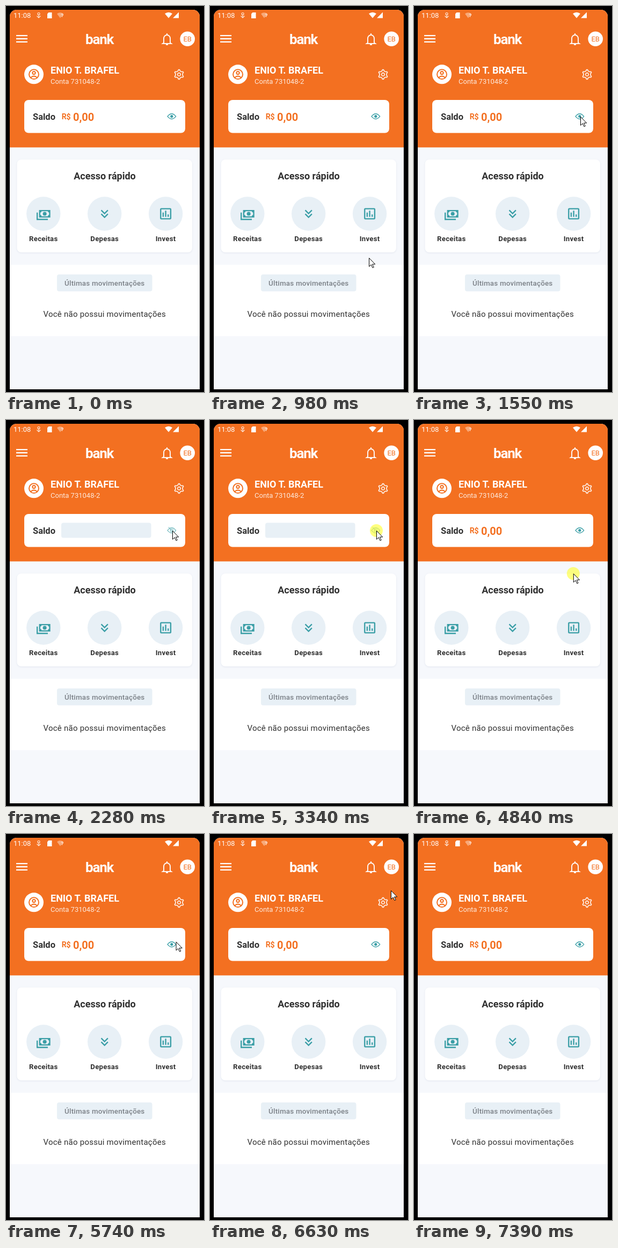
An HTML page that plays this animation: 369 by 719 pixels, repeating every 8000 ms.

```html
<!DOCTYPE html>
<html lang="pt">
<head>
<meta charset="utf-8">
<title>Saldo</title>
<style>
  html, body { margin: 0; width: 100%; height: 100%; overflow: hidden; background: #000; }
  svg { display: block; width: 369px; height: 719px; }
  text { font-family: Roboto, "Noto Sans", sans-serif; fill: #303030; }
  .bold { font-weight: 700; }
  .mid { text-anchor: middle; }
  .white { fill: #fff; }
  .orange { fill: #f37021; }
  .teal { fill: #3a9ea6; }
  .pale { fill: #e8f0f6; }
  .line { fill: none; stroke-width: 2; }
  .line.white { stroke: #fff; }
  .line.orange { stroke: #f37021; }
  .line.teal { stroke: #3a9ea6; }
  .card { fill: #fff; filter: drop-shadow(0 1px 1.5px rgba(90, 110, 150, .13)); }
</style>
</head>
<body>
<svg viewBox="0 0 369 719">
  <defs>
    <clipPath id="screen"><rect x="7" y="7" width="354" height="720" rx="12.500"/></clipPath>
  </defs>
  <rect width="369" height="719"/>
  <g clip-path="url(#screen)">
    <rect width="369" height="714" fill="#f6f8fc"/>
    <rect class="orange" width="369" height="263.400"/>
    <rect class="white" y="482" width="369" height="133"/>
  </g>

  <!-- status bar -->
  <text class="white" x="14" y="22.400" font-size="13">11:08</text>
  <g class="white">
    <path d="M79.500 12H85.500V23H77V14.500Z"/>
    <path d="M296 14.300Q303 9 310 14.300L303 22.500Z"/>
    <path d="M322 11.500V22.500H311Z"/>
    <path d="M95 14.500Q101 10 107 14.500L101 22.500Z" opacity=".4"/>
  </g>
  <g class="line white" style="stroke-width:1.200" opacity=".85">
    <circle cx="61" cy="14.500" r="2"/>
    <path d="M61 16.500V22M57.500 18.500L61 22L64.500 18.500"/>
    <path d="M103 16q2-2.500 3.500 0q0 1.500-2 2.500v2"/>
  </g>

  <!-- top bar -->
  <path class="line white" d="M19 55.200H40M19 61H40M19 66.800H40" style="stroke-width:2.300"/>
  <text class="white bold" x="148" y="71" font-size="26" letter-spacing="-1.200">bank</text>
  <g class="line white" opacity=".93">
    <path d="M294 68.500V60.500a6 6.500 0 0 1 12 0V68.500L308 70H292Z"/>
    <path d="M300 51V54M298 72H302"/>
  </g>
  <circle class="white" cx="338.200" cy="61.200" r="13.800"/>
  <text class="orange mid" x="338.200" y="66" font-size="13">EB</text>

  <!-- profile -->
  <circle class="white" cx="52" cy="127.300" r="18"/>
  <g class="line orange">
    <circle cx="52" cy="127.300" r="9"/>
    <circle cx="52" cy="124.600" r="2.700"/>
    <path d="M46 133.400Q52 127.800 58 133.400"/>
  </g>
  <text class="white bold" x="83" y="126" font-size="18">ENIO T. BRAFEL</text>
  <text class="white" x="83" y="144.500" font-size="13" opacity=".85">Conta 731048-2</text>
  <g class="line white" style="stroke-width:1.700" opacity=".9" stroke-linejoin="round" transform="translate(322.500 127.500)">
    <path id="gear"/>
    <circle r="2.800"/>
  </g>

  <!-- balance -->
  <rect class="white" x="34" y="175" width="300" height="61.500" rx="8"/>
  <text class="bold" x="50" y="212" font-size="16.500">Saldo</text>
  <g id="amount" class="bold">
    <text class="orange" x="103.700" y="211" font-size="14">R$</text>
    <text class="orange" x="125" y="213.600" font-size="20">0,00</text>
  </g>
  <rect id="mask" class="pale" x="103" y="191.500" width="167.500" height="28" rx="4"/>
  <g id="eye" transform="translate(308.800 205.600)">
    <path class="line teal" d="M-7.800 0Q0-9.800 7.800 0Q0 9.800-7.800 0Z" style="stroke-width:1.400"/>
    <circle id="pupil" class="teal" r="2.600"/>
    <g id="shut" class="line teal" style="stroke-width:1.200">
      <circle r="2.600"/>
      <path d="M-6-6L6 6"/>
    </g>
  </g>

  <!-- shortcuts -->
  <rect class="card" x="20.500" y="286" width="326.500" height="173" rx="8"/>
  <text class="bold mid" x="184" y="323" font-size="18">Acesso rápido</text>
  <g id="shortcuts"></g>

  <!-- movements -->
  <rect class="pale" x="95" y="500" width="177.500" height="31.500" rx="4"/>
  <text class="mid" x="183.800" y="521" font-size="13.400" letter-spacing=".2" font-weight="500" style="fill:#7b8087">Últimas movimentações</text>
  <text class="mid" x="183.700" y="579.300" font-size="15" letter-spacing=".25">Você não possui movimentações</text>

  <g id="pointer">
    <circle id="press" r="12" fill="#ff0" opacity=".5"/>
    <path d="M.5 .5V16.300L4.200 12.900L7 18.700L9.200 17.700L6.500 12H11.700Z" fill="#fff" stroke="#000"/>
  </g>
</svg>
<script>
  const LOOP = 8000, STEP = 70;
  const el = id => document.getElementById(id);
  const show = (id, on) => el(id).setAttribute('visibility', on ? 'visible' : 'hidden');

  function gearPath(teeth, inner, outer) {
    const points = [];
    for (let i = 0; i < teeth * 4; i++) {
      const r = i % 4 === 1 || i % 4 === 2 ? outer : inner;
      const a = ((i >> 2) + (i % 4 - 1.5) * .2) / teeth * 2 * Math.PI - Math.PI / 2;
      points.push((r * Math.cos(a)).toFixed(2) + ' ' + (r * Math.sin(a)).toFixed(2));
    }
    return 'M' + points.join('L') + 'Z';
  }
  el('gear').setAttribute('d', gearPath(6, 6.7, 8.9));

  const cash = `<g class="teal">
      <rect x="5" y="6" width="18" height="12"/>
      <path class="pale" d="M9 8H19a2 2 0 0 0 2 2V14a2 2 0 0 0-2 2H9a2 2 0 0 0-2-2V10a2 2 0 0 0 2-2Z"/>
      <circle cx="14" cy="12" r="3"/>
    </g><path class="line teal" d="M2 10V21H19"/>`;
  const chevrons = '<path class="line teal" d="M6.700 6.300l5.300 5.300l5.300-5.300m-10.600 6l5.300 5.300l5.300-5.300"/>';
  const chart = `<g class="line teal">
      <rect x="4" y="4" width="16" height="16" rx="1"/>
      <path d="M8 17V10M12 17V7M16 17V13"/>
    </g>`;
  const shortcut = ([label, icon], i) => `<g transform="translate(${69.8 + 113.9 * i} 387)">
      <circle class="pale" r="31.700"/>
      <g transform="scale(${28 / 24}) translate(-12 -12)">${icon}</g>
      <text class="bold mid" y="50.500" font-size="13.200" letter-spacing=".25">${label}</text>
    </g>`;
  el('shortcuts').innerHTML =
    [['Receitas', cash], ['Depesas', chevrons], ['Invest', chart]].map(shortcut).join('');

  // Each move curves from where the last one ended, slowing towards its end
  const entry = { x: 271, y: 700 };
  const moves = [
    { at: 780, steps: 11, via: { x: 318, y: 300 }, to: { x: 310, y: 206 } },
    { at: 3480, steps: 6, via: { x: 303, y: 245 }, to: { x: 291, y: 274 } },
    { at: 4090, steps: 5, via: { x: 291, y: 220 }, to: { x: 291, y: 172 } },
    { at: 4630, steps: 11, via: { x: 300, y: 300 }, to: { x: 297, y: 398 } },
    { at: 5460, steps: 11, via: { x: 306, y: 246 }, to: { x: 340, y: 47 } },
    { at: 6350, steps: 11, via: { x: 347, y: 108 }, to: { x: 322, y: 128 } },
    { at: 7120, steps: 3, via: { x: 338, y: 160 }, to: { x: 356, y: 197 } }
  ];
  const POINTER_END = 7390;
  const taps = [{ down: 2080, up: 2220 }, { down: 3340, up: 3480 }];
  const drag = { down: 4090, up: 5180 };
  const held = (t, { down, up }) => t >= down && t < up;

  function pointerAt(t) {
    const i = moves.findLastIndex(move => t >= move.at);
    if (i < 0 || t >= POINTER_END) return null;
    const { at, steps, via, to } = moves[i];
    const from = i ? moves[i - 1].to : entry;
    const p = Math.min(1, Math.floor((t - at) / STEP) / steps);
    const u = 1 - (1 - p) ** 2;
    const bend = axis =>
      (1 - u) ** 2 * from[axis] + 2 * u * (1 - u) * via[axis] + u * u * to[axis];
    return { x: bend('x'), y: bend('y') };
  }

  function eyeOpacity(t) {
    const tap = taps.findLast(({ down }) => t >= down);
    return tap ? Math.min(1, .5 + .5 * Math.max(0, t - tap.up) / 190) : 1;
  }

  function draw(t) {
    const hidden = t >= taps[0].up && t < taps[1].up;
    show('amount', !hidden);
    show('mask', hidden);
    show('pupil', !hidden);
    show('shut', hidden);
    el('eye').setAttribute('opacity', eyeOpacity(t));

    const tip = pointerAt(t);
    show('pointer', tip);
    show('press', tip && [...taps, drag].some(press => held(t, press)));
    if (tip) el('pointer').setAttribute('transform', `translate(${tip.x} ${tip.y})`);
  }

  const begin = performance.now();
  function tick() {
    draw((performance.now() - begin) % LOOP);
    requestAnimationFrame(tick);
  }
  tick();
</script>
</body>
</html>
```
